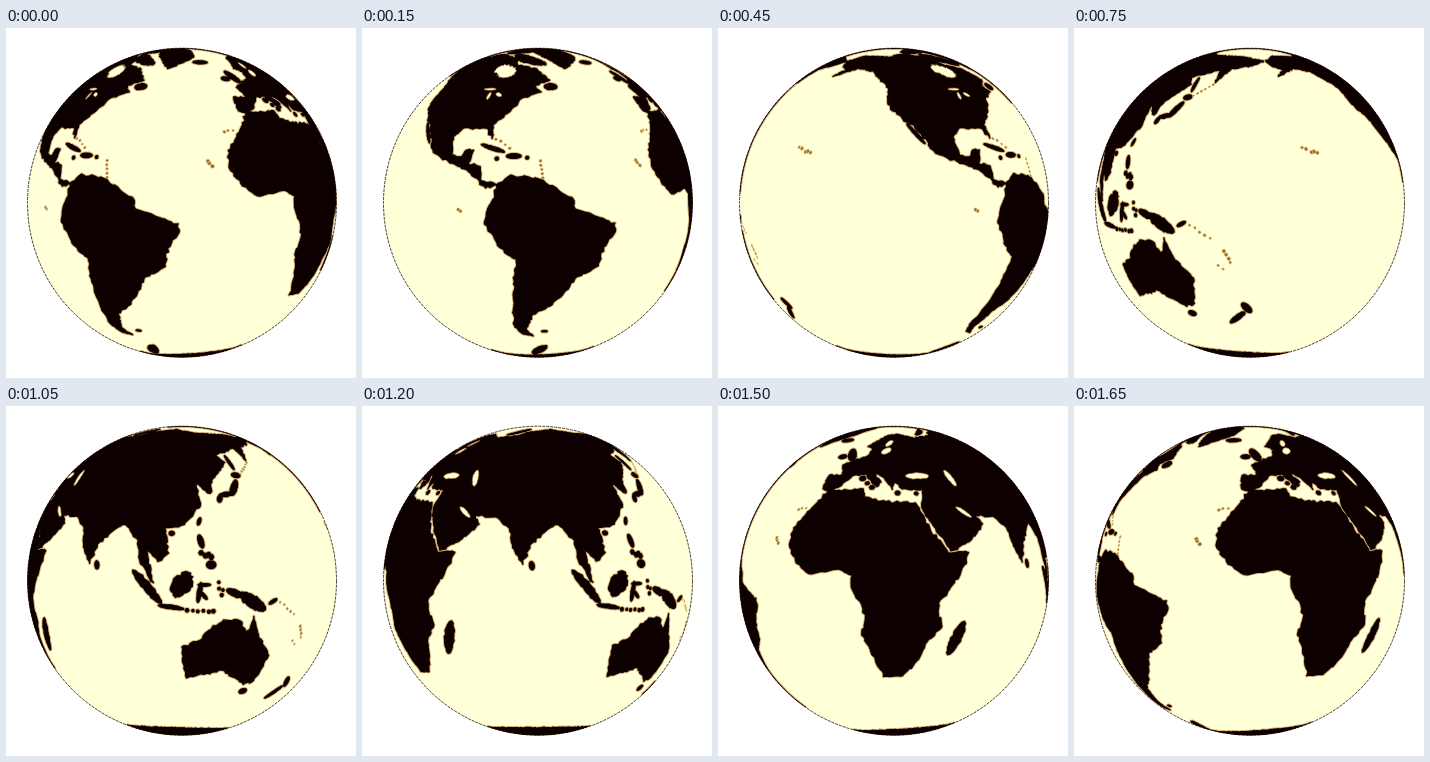
Recreate the animation shown at these times as an HTML page. Size 350x350 px, loop 1.8 s.

```html
<!DOCTYPE html>
<html lang="en">
<head>
<meta charset="utf-8">
<title>Spinning globe</title>
<style>
html, body { margin: 0; width: 100%; height: 100%; overflow: hidden; background: #fff; }
svg { display: block; width: 100vw; height: 100vh; }
</style>
</head>
<body>
<svg viewBox="0 0 350 350">
  <defs><clipPath id="disc"><circle cx="176" cy="174.7" r="154.7"/></clipPath></defs>
  <circle cx="176" cy="174.7" r="154.4" fill="#ffffd8"/>
  <g clip-path="url(#disc)" stroke-linejoin="round">
    <path id="fringe" fill="none" stroke="#b8742a" stroke-opacity=".6" stroke-width="3"/>
    <path id="land" fill="#0d0000" stroke="#0d0000" stroke-width="1.2"/>
    <path id="water" fill="#ffffd8" stroke="#a06a2c" stroke-width=".7"/>
    <path id="islets" fill="#96662c" stroke="#d9b36c" stroke-width=".7"/>
  </g>
  <circle cx="176" cy="174.7" r="154.5" fill="none" stroke="#1c0a00" stroke-width=".8" stroke-dasharray="3 1"/>
</svg>
<script>
const CX = 176, CY = 174.7, R = 154.5;
const DIST = 20, TILT = 2.2, START = -35, STEP_DEG = 30, STEP_MS = 150, STEPS = 12;
const rad = Math.PI / 180, cos = d => Math.cos(d * rad), sin = d => Math.sin(d * rad);
const shapes = { land: [], water: [], islets: [] };

let seed = 7;
const rand = () => (seed = seed * 16807 % 2147483647) / 2147483647 - .5;

// The map is slightly stretched around the globe.
const warp = lon => lon + 3 * cos(lon - 60) - .8;

// Joins key points by short edges with a ragged coast, always anticlockwise.
function coast(pts, rough = 1) {
  const next = i => pts[(i + 1) % pts.length];
  const area = pts.reduce((sum, [x, y], i) => sum + x * next(i)[1] - next(i)[0] * y, 0);
  if (area < 0) pts.reverse();
  return pts.flatMap(([x, y], i) => {
    const [u, v] = next(i), n = Math.max(1, Math.ceil(Math.hypot(u - x, v - y) / 1.3));
    return Array.from({ length: n }, (_, k) => {
      const j = k ? rough : 0;
      const lon = x + (u - x) * k / n + rand() * j, lat = y + (v - y) * k / n + rand() * j;
      return [warp(lon) * rad, lat * rad];
    });
  });
}

function land(...n) {
  const pts = [];
  for (let i = 0; i < n.length; i += 2) pts.push([n[i], n[i + 1]]);
  shapes.land.push(coast(pts));
}

// Ellipse with half axes a and b in degrees, turned anticlockwise from east.
function blob(kind, lon, lat, a, b = a, turn = 0) {
  const pts = [], count = a < 1 ? 6 : 14;
  for (let i = 0; i < count; i++) {
    const t = 360 * i / count, x = a * cos(t), y = b * sin(t);
    pts.push([lon + (x * cos(turn) - y * sin(turn)) / cos(lat), lat + x * sin(turn) + y * cos(turn)]);
  }
  shapes[kind].push(coast(pts, Math.min(a, b) * .4));
}
const isle = (...p) => blob('land', ...p);
const sea = (...p) => blob('water', ...p);

// Evenly spaced specks from one place to another, shaken by the given spread.
function chain(kind, count, size, x0, y0, x1, y1, spread = .5) {
  for (let i = 0; i < count; i++) {
    const t = i / (count - 1);
    blob(kind, x0 + (x1 - x0) * t + rand() * spread, y0 + (y1 - y0) * t + rand() * spread, size * (1 + rand() * .5));
  }
}

// Africa
land(-6,36, 10,37, 11,33.5, 20,31.5, 32,31, 37,20, 43,12, 51,12, 47,4, 39,-6, 40.5,-15, 35,-21, 33,-27,
  27,-34, 19,-34.5, 14.5,-23, 11.8,-17, 13.5,-10, 9,-1, 9,4, 4,6.2, -7.5,4.4, -13.5,9, -17.4,14.7, -17,21, -10,30);
// Eurasia
land(-9,37, -9,43.3, -1.5,43.5, -4.5,48.4, 8,54, 10,58, 5,60, 15,68.5, 27,71, 41,67, 60,69, 70,73, 104,77.5,
  130,72, 170,70, 190,66, 178,62, 163,60, 156,51, 155,59, 136,54.5, 140,50, 129,41, 127,35, 121,39.5, 122,30,
  115,22.5, 107,21, 109,12, 105,9, 100.5,13, 103.5,1.5, 98.5,8, 97,16.5, 91,22.5, 86.5,20.5, 80,15, 77.5,8,
  73,16, 72,21, 67,25, 57,26, 59.5,22.5, 52,16, 44,12.7, 39,21, 34.5,29, 36,36.5, 27,37, 23.5,40, 22.7,36.7,
  19.5,41, 13,45.5, 17.5,40, 15.8,38, 10,44, 3.2,43, -.5,38.5, -5.5,36);
// North America
land(-168,66, -156,71, -128,70, -94,71, -82,68, -78,62.5, -64,60, -56,52.5, -65,49, -61,46, -70,43, -75.5,36,
  -81,31, -80.3,25.5, -83,29.5, -94,29.5, -97.5,26, -96,19, -91.5,18.5, -90,21, -87,21, -88.5,16, -83.5,15,
  -83,10, -77,8.5, -81,7.3, -87,12.5, -95,16, -105.5,20, -113,31, -117,32.5, -124,40, -124,48, -135,58,
  -148,60.5, -164,54.7, -158,59, -165,62);
// South America
land(-77,8.5, -72,12, -62,10.5, -51,4, -50,0, -35.3,-5.3, -35,-8.5, -39,-14, -40,-21, -48.5,-26, -53,-33.5,
  -57.5,-38, -65,-42, -69,-51, -65.5,-55, -72,-53, -75,-48, -73.5,-39, -70.4,-18.3, -76,-14, -81.3,-5.5, -80,0, -77.5,4);
// Australia
land(114,-22, 121,-19.5, 126,-14, 131,-12, 136.5,-12.2, 140,-17.5, 142.4,-10.8, 146,-19, 153,-26, 150,-37,
  145,-38.7, 138,-35, 132,-31.7, 124,-33.5, 116,-35, 115,-30);
// Greenland
land(-44,60, -22,70, -18,80, -35,83.5, -70,78, -53,68);
// Antarctica: a wavy ring around the pole with its peninsula
const ring = [180, -90, -180, -90];
for (let lon = -180; lon <= 180; lon += 15) ring.push(lon, -71.5 + 4.5 * cos(lon - 90));
land(...ring);
isle(-62, -68, 5.5, 1.8, 70);

// Northern islands
isle(-2.5, 54.5, 4, 1.4, 110);
isle(-8, 53.3, 1.6, 1.2);
isle(-19, 65, 2.6, 1.3);
isle(59, 74, 5, .9, 50);
isle(-56, 48.8, 2.2, 1.7);
isle(-73, 68, 8, 2.5, -40);
isle(-110, 71, 4, 2);
isle(-80, 79.5, 7, 3, 40);
isle(-112.5, 27.5, 5, .6, -53);
chain('land', 3, .9, 9, 42, 14, 37.5);
chain('land', 2, .8, 25, 35.2, 33, 35);
// Caribbean
isle(-79.5, 21.8, 4.6, .7, -18);
isle(-71.3, 18.9, 2.6, .9);
chain('land', 2, .7, -77.3, 18.1, -66.4, 18.2);
chain('islets', 5, .5, -61.5, 17, -61, 11);
chain('islets', 4, .5, -78.5, 25.5, -73, 22);
// East Asia
isle(131, 32.7, 1.5, .9, 70);
isle(134.5, 34.6, 3, .9, 10);
isle(139.5, 37.6, 4, 1.2, 60);
isle(143, 43.3, 1.8, 1.2);
isle(143, 50, 4, .6, 95);
isle(121, 23.7, 1.5, .6, 70);
isle(110, 19.2, 1, .8);
isle(80.8, 7.5, 1.5, .9, 100);
chain('islets', 6, .5, 146, 44, 155, 50);
// Indonesia and the Philippines
isle(101, 0, 8, 1.5, -47);
isle(110, -7.2, 4.8, .7, -8);
isle(114, 1, 5, 3.3, 50);
isle(120.5, -2, 3.6, .8, 80);
isle(122.3, .7, 2.4, .5);
isle(122, -3, 2, .6, -45);
isle(134, -2.3, 3.4, 1.2, -20);
isle(141.5, -5.5, 6.5, 2.1, -28);
isle(121.3, 16.2, 2.5, 1, 105);
isle(125, 7.8, 1.8, 1.4);
chain('land', 4, .8, 121, 13, 125, 10, 2);
chain('land', 6, .6, 116, -8.5, 126, -8.8);
chain('land', 4, .6, 128, 1, 129, -3.3, 1.5);
isle(150.5, -5.6, 2, .6, 25);
// Southern islands
isle(47, -19, 6.8, 1.9, 70);
isle(146.5, -42, 1.6, 1.3);
isle(175.6, -38.8, 2.8, 1.3, -55);
isle(170.5, -43.8, 4.2, 1.1, 45);
isle(-59, -51.8, 1, .5);
chain('islets', 5, .6, 154, -6, 162, -10.5);
chain('islets', 4, .6, 167, -15, 169.5, -19.5);
chain('islets', 2, .6, 164.5, -20.6, 166.5, -22);
// Ocean specks
chain('islets', 5, .7, -161, 22, -156, 19.5, 1.5);
chain('islets', 3, .7, -25, 16.8, -23.4, 15, 1.5);
chain('islets', 3, .5, -17.5, 28.3, -14, 28.6);
chain('islets', 2, .7, -91.4, -.4, -90.2, -1);

// Inland seas and lakes
sea(18.5, 57, 2.4, 1.4, 60);
sea(20, 62.5, 2.6, 1, 70);
sea(34.5, 43, 4.2, 1.5);
sea(51, 42, 4, 1.2, -75);
sea(52, 27.2, 3.4, .8, -38);
sea(-85, 58.5, 5, 3.6, -50);
sea(-88, 47.4, 2.4, .6);
sea(-87, 44, 1.8, .6, 85);
sea(-82, 44.6, 1.4, .8, -40);

const lens = Math.sqrt(DIST * DIST - 1);

// Perspective view; hidden points slide onto the rim.
function trace(shape, lon0) {
  let seen = false;
  const pts = shape.map(([lon, lat]) => {
    const c = Math.cos(lat), s = Math.sin(lat), x = c * Math.sin(lon - lon0), depth = c * Math.cos(lon - lon0);
    const y = s * cos(TILT) - depth * sin(TILT), z = s * sin(TILT) + depth * cos(TILT);
    const front = z > 1 / DIST;
    const k = R * (front ? lens / (DIST - z) : 1 / (Math.hypot(x, y) || 1));
    seen = seen || front;
    return (CX + x * k).toFixed(1) + ' ' + (CY - y * k).toFixed(1);
  });
  return seen ? 'M' + pts.join('L') + 'Z' : '';
}

const setPath = (id, d) => document.getElementById(id).setAttribute('d', d);
function draw(step) {
  const lon0 = (START - step * STEP_DEG) * rad;
  for (const kind in shapes) {
    const d = shapes[kind].map(s => trace(s, lon0)).join('');
    setPath(kind, d);
    if (kind === 'land') setPath('fringe', d);
  }
}

let last = -1;
const t0 = performance.now();
function tick() {
  const step = Math.floor((performance.now() - t0) / STEP_MS) % STEPS;
  if (step !== last) draw(last = step);
  requestAnimationFrame(tick);
}
tick();
</script>
</body>
</html>
```
